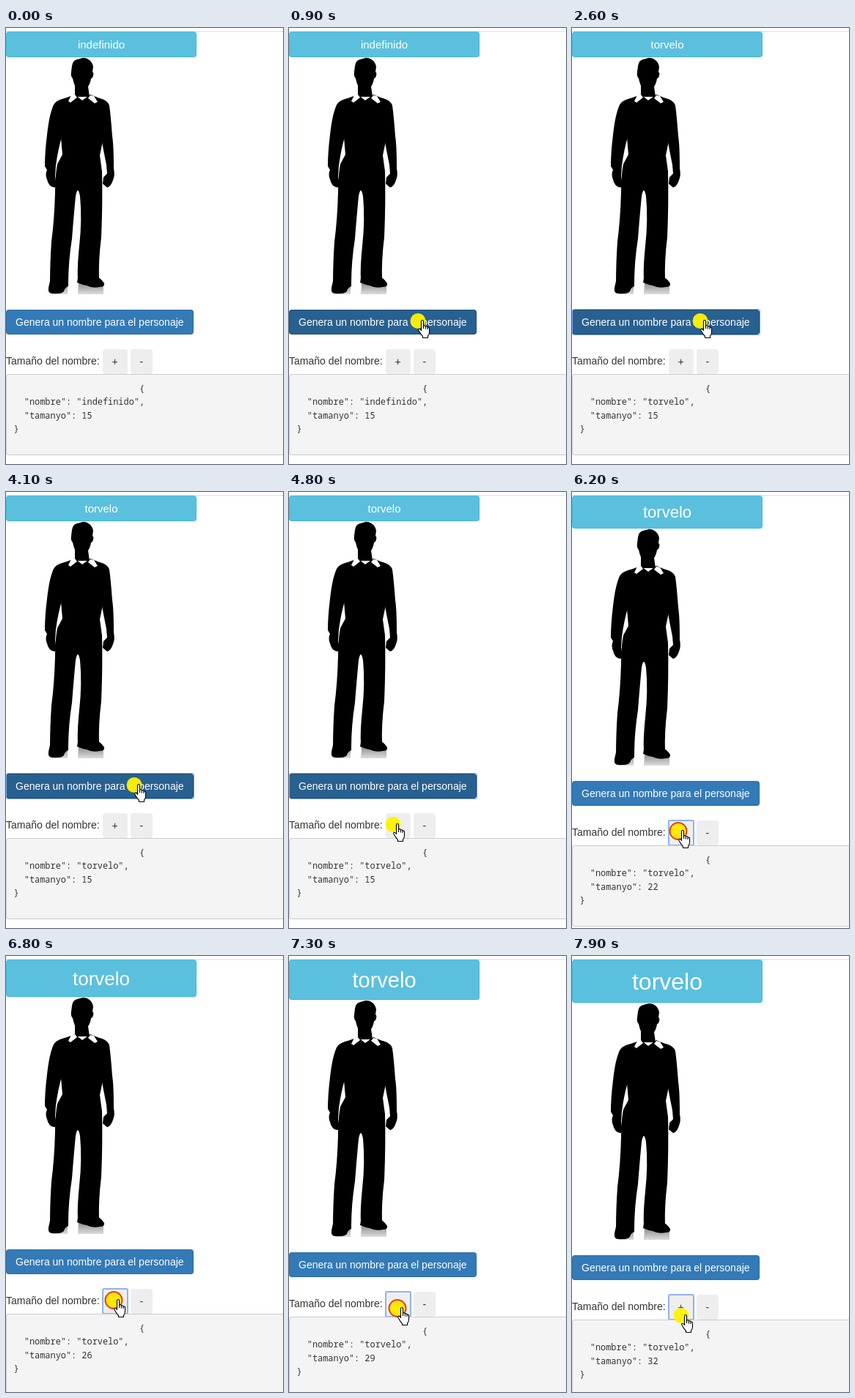
Write an HTML page with a canvas that moves like this. It is 378 px wide and 596 px high and loops after 8 s.

```html
<!DOCTYPE html>
<html lang="es">
<head>
<meta charset="utf-8">
<title>Nombre del personaje</title>
<style>
  html, body { margin: 0; width: 100%; height: 100%; overflow: hidden; background: #fff; }
  canvas { display: block; }
</style>
</head>
<body>
<canvas id="stage" width="378" height="596"></canvas>
<script>
const ctx = document.getElementById('stage').getContext('2d');
const LOOP = 8000, STEP = 100;
const SANS = '"Liberation Sans", Arial, sans-serif';
const MONO = '11.92px "Noto Sans Mono", "DejaVu Sans Mono", monospace';

// Silhouette parts
const FIGURE = [
  // head and neck
  'M104 41C110 40 118 45 119 53L118 60Q120 61 119 65Q118 69 116 69Q115 76 112 80L114 94H94V79Q92 74 91 69Q88 66 89 60L90 52Q91 44 97 43Z',
  // torso and legs
  'M94 91L72 99Q78 128 75 150L77 173L70 186Q67 202 67 224Q66 262 62 292Q60 322 60 349L85 349Q85 320 90 288Q93 250 95 230Q98 214 101 230Q104 262 100 298Q97 326 98 345L127 345Q126 318 130 286Q132 240 131 196L128 174L133 150Q130 122 135 99L115 91L104 99Z',
  // arms
  'M80 96Q68 99 65 105Q59 118 56 146Q53 170 53 189L56 194Q53 200 56 207Q58 217 66 218L69 216L67 203L68 188Q71 166 76 149Z',
  'M128 96Q139 99 141 106Q143 120 145 148Q147 160 147 192Q149 201 146 208Q143 217 138 218L132 213L133 204L138 199L137 187Q133 168 130 150Z',
  // shoes
  'M60 346L58 355Q57 363 63 363Q75 364 79 360Q80 355 85 353V345Z',
  'M98 342L97 348Q104 351 110 352Q118 356 128 354Q135 354 134 349Q130 343 126 341Z'
].map(d => new Path2D(d));
const COLLAR = new Path2D('M89 92L85 100L88 102L97 95L94 91ZM115 92L120 93L125 101L121 103L112 96Z');

const HAND = new Path2D('M4.5 2.2Q4.5 .5 6 .5T7.5 2.2V8Q10 7 10.3 9Q12.5 8.2 13 10Q15.5 9.6 15.5 12V17Q15.5 20 13.5 22V24.5H6.5V22.5Q4 20 1 14.5Q.2 12.6 1.5 12.2Q3 12 4.5 14.5Z');
const ARROW = new Path2D('M.5 .5V16.5L4.2 13L6.7 18.6L9 17.6L6.6 12.2H11.8Z');

// Pointer keys: time, x, y
const PATH = [
  [100, 336, 532], [400, 255, 466], [700, 190, 409], [900, 176, 399], [1500, 176, 399], [1600, 175, 399],
  [4300, 175, 399], [4800, 142, 453], [5500, 142, 453], [6800, 147, 469], [7650, 149, 488], [7800, 149, 490], [LOOP, 149, 490]
];
const NAME_CLICKS = [1600, 2600, 3500];
const PLUS_CLICKS = [5150, 5250, 5400, 5580, 5800];
for (let i = 0; i < 12; i++) PLUS_CLICKS.push(6000 + i * 150);
const PRESS = 100;

function pointerAt(t) {
  if (t < PATH[0][0]) return null;
  const i = PATH.findIndex(key => key[0] > t);
  const [t0, x0, y0] = PATH[i - 1], [t1, x1, y1] = PATH[i];
  const k = (t - t0) / (t1 - t0);
  return { x: Math.round(x0 + (x1 - x0) * k), y: Math.round(y0 + (y1 - y0) * k) };
}

function box(x, y, w, h, fill, border = fill) {
  ctx.fillStyle = border;
  ctx.beginPath();
  ctx.roundRect(x, y, w, h, 4);
  ctx.fill();
  ctx.fillStyle = fill;
  ctx.beginPath();
  ctx.roundRect(x + 1, y + 1, w - 2, h - 2, 3);
  ctx.fill();
}

function text(str, x, y, color, font = '14px ' + SANS, align = 'left') {
  ctx.font = font;
  ctx.fillStyle = color;
  ctx.textAlign = align;
  ctx.fillText(str, x, y);
}

function ring(x, y, w, h, width, color) {
  ctx.strokeStyle = color;
  ctx.lineWidth = width;
  ctx.beginPath();
  ctx.roundRect(x, y, w, h, 2);
  ctx.stroke();
}

function drawFigure(dy) {
  ctx.save();
  ctx.translate(0, dy);
  const shade = ctx.createLinearGradient(0, 348, 0, 365);
  shade.addColorStop(0, '#8c8c8c');
  shade.addColorStop(1, '#e2e2e2');
  ctx.fillStyle = shade;
  ctx.fill(new Path2D('M99 348H133V364H98ZM70 364L84 352V364Z'));
  ctx.fillStyle = '#000';
  FIGURE.forEach(part => ctx.fill(part));
  ctx.fillStyle = '#fff';
  ctx.fill(COLLAR);
  ctx.restore();
}

function drawPointer({ x, y }, overButton, pressed) {
  ctx.globalAlpha = 0.94;
  ctx.fillStyle = pressed ? '#ffe800' : '#fff200';
  ctx.beginPath();
  ctx.arc(x, y + 1.5, pressed ? 11.5 : 10.5, 0, Math.PI * 2);
  ctx.fill();
  ctx.globalAlpha = 1;
  if (pressed) {
    ctx.strokeStyle = '#e8401c';
    ctx.lineWidth = 2;
    ctx.stroke();
  }
  ctx.save();
  ctx.translate(overButton ? x : x + 5, y);
  const shape = overButton ? HAND : ARROW;
  ctx.fillStyle = '#fff';
  ctx.fill(shape);
  ctx.strokeStyle = '#000';
  ctx.lineWidth = 1.1;
  ctx.lineJoin = 'round';
  ctx.stroke(shape);
  if (overButton) ctx.stroke(new Path2D('M7.5 8V12M10.3 9V12.5M13 10V13'));
  ctx.restore();
}

function draw(t) {
  const size = 15 + PLUS_CLICKS.filter(c => t >= c).length;
  const dy = Math.round((size - 15) * 1.4286);
  const name = t < NAME_CLICKS[0] ? 'indefinido' : 'torvelo';
  const pointer = pointerAt(t);
  const pressed = NAME_CLICKS.concat(PLUS_CLICKS).some(c => t >= c - PRESS && t < c);
  const plusFocus = t >= PLUS_CLICKS[0] - PRESS;
  const mainFocus = !plusFocus && t >= NAME_CLICKS[0] - PRESS;
  const inside = (x, y, w, h) => pointer && pointer.x + 6 >= x && pointer.x + 6 <= x + w
    && pointer.y >= y && pointer.y <= y + h;
  const overMain = inside(0, 385 + dy, 256, 34);
  const overPlus = inside(132, 439 + dy, 34, 34);

  ctx.fillStyle = '#fff';
  ctx.fillRect(0, 0, 378, 596);
  ctx.fillStyle = '#ddd';
  ctx.fillRect(0, 4, 378, 1);

  // Name label grows with its font size
  box(0, 5, 260, 35 + dy, '#5bc0de', '#46b8da');
  text(name, 130, Math.round(12 + size * 1.0608), '#fff', size + 'px ' + SANS, 'center');

  drawFigure(dy);

  ctx.save();
  ctx.translate(0, dy);
  const dark = overMain || mainFocus;
  box(0, 385, 256, 34, dark ? '#286090' : '#337ab7', dark ? '#204d74' : '#2e6da4');
  if (mainFocus) ring(0.5, 384.5, 256, 35, 1, '#7fa6ee');
  text('Genera un nombre para el personaje', 13, 407, '#fff');

  text('Tamaño del nombre:', 0, 460, '#333');
  box(132, 439, 34, 34, '#eee');
  box(170, 439, 30, 34, '#eee');
  if (plusFocus) ring(132, 439, 34, 34, 2, '#8fb3ee');
  text('+', 144.5, 461, '#333');
  text('-', 182.5, 461, '#333');

  box(0, 473, 400, 111, '#f4f4f4', '#ccc');
  const lines = [' '.repeat(24) + '{', `  "nombre": "${name}",`, `  "tamanyo": ${size}`, '}'];
  lines.forEach((line, i) => text(line, 10.5, Math.round(497 + i * 18.3), '#333', MONO));
  ctx.restore();

  if (pointer) drawPointer(pointer, overMain || overPlus, pressed);
}

function frame(now) {
  draw(Math.floor((now % LOOP) / STEP) * STEP);
  requestAnimationFrame(frame);
}
requestAnimationFrame(frame);
</script>
</body>
</html>
```
